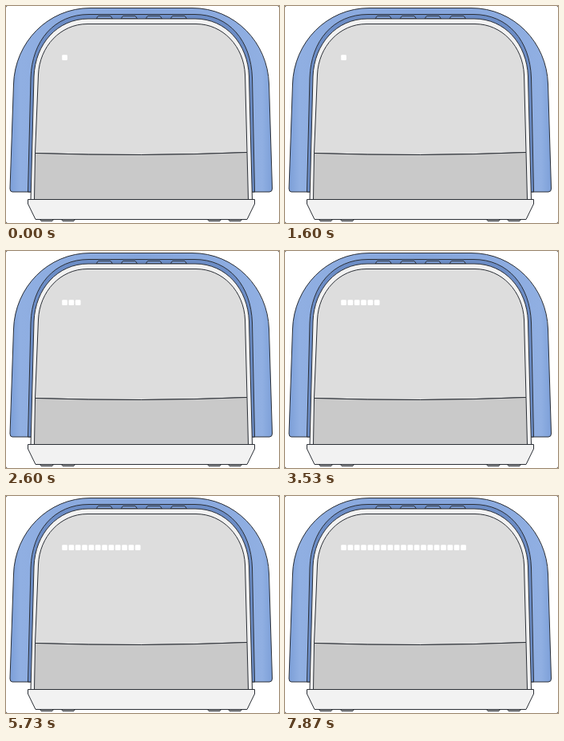
Write an HTML page that moves like this. It is 342 px wide and 272 px high and loops after 8 s.

```html
<!DOCTYPE html>
<html lang="en">
<head>
<meta charset="utf-8">
<title>Terminal dots</title>
<style>
  html, body { margin: 0; width: 342px; height: 272px; overflow: hidden; background: #222; }
  body { position: relative; }
  svg { display: block; }
  #device { background: #fff; border-radius: 2px; }
  #device path { stroke: #2b2f36; stroke-width: 1; stroke-linejoin: round; }
  #typed {
    position: absolute; left: 69px; top: 60px; height: 9px;
    overflow: hidden;
    animation: type 8s infinite;
  }
  /* one dot waits, then 18 more arrive about every 320 ms */
  @keyframes type {
    0% { width: 9px; animation-timing-function: step-end; }
    27.985% { width: 9px; animation-timing-function: steps(18, start); }
    100% { width: 158.94px; }
  }
</style>
</head>
<body>
<svg id="device" width="342" height="272" viewBox="0 0 342 272">
  <defs>
    <linearGradient id="shell" x1="5" x2="334" y1="0" y2="0" gradientUnits="userSpaceOnUse">
      <stop offset="0" stop-color="#7c9fd8"/>
      <stop offset=".04" stop-color="#90afe2"/>
      <stop offset=".5" stop-color="#84a4db"/>
      <stop offset=".96" stop-color="#90afe2"/>
      <stop offset="1" stop-color="#7c9fd8"/>
    </linearGradient>
  </defs>
  <!-- shell -->
  <path fill="url(#shell)" d="M8 233 Q5 233 5 229 L9.500 98 C11 46 52 2.500 106 2.500 H233 C287 2.500 328 46 329.500 98 L333.500 229 Q333.500 233 330 233 H27 Z"/>
  <path fill="#6c8dc6" d="M27.500 233 L31 90 C32.500 44 60 10.500 104 10.500 H236 C280 10.500 307 44 308.500 90 L311.500 233 Z"/>
  <!-- vents -->
  <g fill="#7c9bd0">
    <path d="M113 16 L115.500 12.500 H131 L133.500 16 Z"/>
    <path d="M144 16 L146.500 12.500 H162 L164.500 16 Z"/>
    <path d="M175 16 L177.500 12.500 H193 L195.500 16 Z"/>
    <path d="M206 16 L208.500 12.500 H224 L226.500 16 Z"/>
  </g>
  <!-- bezel and screen -->
  <path fill="#f2f2f2" d="M31 243 L35 88 C36.500 48 64 16 103 16 H237 C276 16 303 48 304.500 88 L308.500 243 Z"/>
  <path fill="#dddddd" d="M36.500 184.500 L40.500 86 C42 51 68 22.500 102 22.500 H238 C272 22.500 298 51 299.500 86 L302 183.500 Q170 189 36.500 184.500 Z"/>
  <path fill="#c9c9c9" d="M36.500 184.500 Q170 189 302 183.500 L303.500 243 H35.500 Z"/>
  <!-- base and feet -->
  <g fill="#aaaaaa">
    <path d="M42 267 L44 269.500 H58 L60 267 Z"/>
    <path d="M69 267 L71 269.500 H85 L87 267 Z"/>
    <path d="M252 267 L254 269.500 H268 L270 267 Z"/>
    <path d="M278 267 L280 269.500 H294 L296 267 Z"/>
  </g>
  <path fill="#f2f2f2" d="M27.500 242.500 H311.500 V248 L302 267.500 H37 L27.500 248 Z"/>
</svg>
<div id="typed"><svg width="162" height="9"><g id="dots" fill="#fff"></g></svg></div>
<script>
  const dots = document.getElementById('dots');
  for (let i = 0; i < 19; i++) {
    const dot = document.createElementNS('http://www.w3.org/2000/svg', 'rect');
    const box = { x: 1.2 + i * 8.33, y: 1.2, width: 6.7, height: 6.7, rx: 1.2 };
    for (const key in box) dot.setAttribute(key, box[key]);
    dots.append(dot);
  }
</script>
</body>
</html>
```
